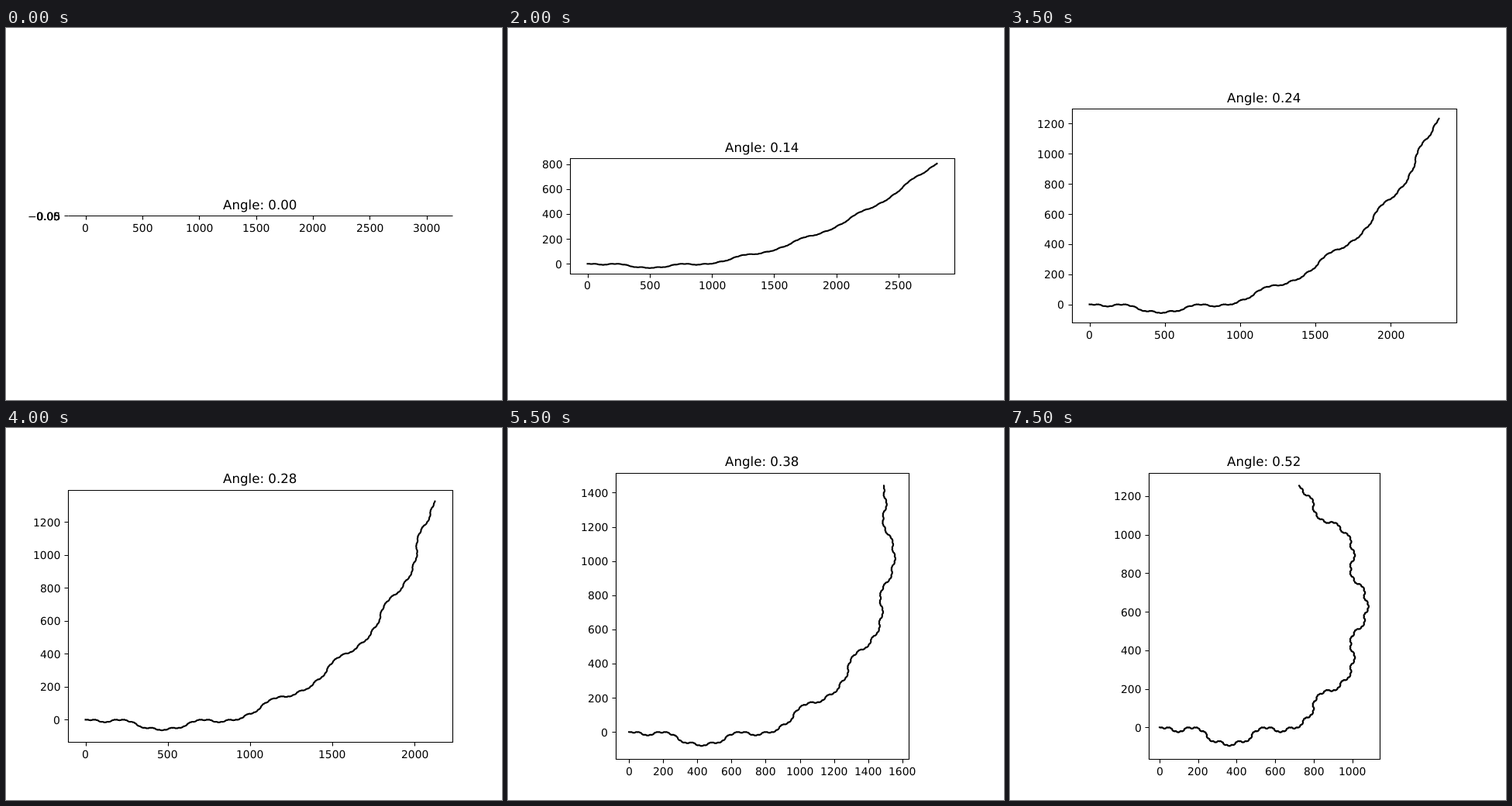
An HTML page that plays this animation: 640x480 px, repeating every 8000 ms.

```html
<!DOCTYPE html>
<html lang="en">
<head>
<meta charset="utf-8">
<title>Folding curve</title>
<style>
  html, body { margin: 0; width: 100%; height: 100%; overflow: hidden; background: #fff; }
  svg { display: block; width: 640px; height: 480px; }
  text { font-family: "DejaVu Sans", sans-serif; text-rendering: geometricPrecision; white-space: pre; }
  path { fill: none; stroke: #000; }
</style>
</head>
<body>
<svg viewBox="0 0 640 480">
  <path id="curve" stroke-width="2.083" stroke-linejoin="round" stroke-linecap="square"/>
  <path id="ticks" stroke-width="1.111"/>
  <path id="frame" stroke-width="1.111" stroke-linecap="square"/>
  <g id="labels"></g>
</svg>
<script>
const STEP_MS = 500, STEPS = 16, SIDE = 4 ** 5;
const AREA = { cx: 328, cy: 242.4, w: 496, h: 369.6 };
const PX_PER_PT = 100 / 72, TICK = 5, PAD = 7 * PX_PER_PT;
const [curve, ticks, frame, labels] =
  ["curve", "ticks", "frame", "labels"].map(id => document.getElementById(id));

// Turn before segment i of a three-sided Koch curve, in units of the angle.
function turn(i) {
  if (i % SIDE === 0) return 2;
  while (i % 4 === 0) i /= 4;
  return i % 4 === 2 ? 2 : -1;
}

function foldedPoints(angle) {
  const points = [[0, 0]];
  let x = 0, y = 0, heading = 0;
  for (let i = 0; i < 3 * SIDE; i++) {
    if (i) heading += turn(i);
    x += Math.cos(heading * angle);
    y += Math.sin(heading * angle);
    points.push([x, y]);
  }
  return points;
}

function limits(values) {
  let min = Math.min(...values), max = Math.max(...values);
  if (min === max) { min -= 0.05; max += 0.05; }
  const margin = (max - min) * 0.05;
  return { min: min - margin, max: max + margin, span: max - min + 2 * margin };
}

// Largest round step that suits the available length and leaves two ticks or more.
function tickValues({ min, max, span }, length, spacing) {
  const bins = Math.max(1, Math.min(9, Math.floor(length / PX_PER_PT / spacing)));
  const raw = span / bins;
  const decade = 10 ** Math.floor(Math.log10(raw));
  const steps = [0.1, 0.2, 0.25, 0.5, 1, 2, 2.5, 5, 10].map(s => s * decade);
  let index = steps.findIndex(s => s >= raw);
  for (; index >= 0; index--) {
    const step = steps[index], values = [];
    for (let n = Math.ceil(min / step); n <= max / step; n++) values.push(n * step);
    if (values.length >= 2 || index === 0) {
      const digits = step < 1 ? 2 : 0;
      return values.map(v => ({ value: v, text: (v + 0).toFixed(digits).replace("-", "\u2212") }));
    }
  }
}

function addText(text, x, y, points, anchor) {
  const node = document.createElementNS("http://www.w3.org/2000/svg", "text");
  node.textContent = text;
  node.setAttribute("font-size", points * PX_PER_PT);
  labels.append(node);
  node.setAttribute("x", Math.round(x - anchor * node.getComputedTextLength()));
  node.setAttribute("y", Math.round(y));
}

const snap = v => Math.floor(v + 0.5) + 0.5;

function draw(step) {
  const angle = step * Math.PI / 90;
  const points = foldedPoints(angle);
  const xLim = limits(points.map(p => p[0])), yLim = limits(points.map(p => p[1]));
  const scale = Math.min(AREA.w / xLim.span, AREA.h / yLim.span);
  const w = xLim.span * scale, h = yLim.span * scale;
  const left = AREA.cx - w / 2, right = left + w;
  const top = AREA.cy - h / 2, bottom = top + h;
  const toX = x => left + (x - xLim.min) * scale;
  const toY = y => bottom - (y - yLim.min) * scale;

  // The flat curve lies in a box without height, so nothing of it shows.
  curve.setAttribute("d", step === 0 ? "" :
    "M" + points.map(([x, y]) => toX(x).toFixed(2) + " " + toY(y).toFixed(2)).join("L"));
  frame.setAttribute("d",
    `M${snap(left)} ${snap(top)}H${snap(right)}V${snap(bottom)}H${snap(left)}Z`);

  labels.replaceChildren();
  let marks = "";
  for (const { value, text } of tickValues(xLim, w, 30)) {
    const x = toX(value);
    marks += `M${snap(x)} ${snap(bottom)}v${TICK}`;
    addText(text, x, bottom + PAD + 11, 10, 0.5);
  }
  for (const { value, text } of tickValues(yLim, h, 20)) {
    const y = toY(value);
    marks += `M${snap(left)} ${snap(y)}h${-TICK}`;
    addText(text, left - PAD, y + 5.5, 10, 1);
  }
  ticks.setAttribute("d", marks);
  addText("Angle: " + angle.toFixed(2), AREA.cx, top - 6 * PX_PER_PT, 12, 0.5);
}

const start = performance.now();
let shown = -1;
function update() {
  const step = Math.floor((performance.now() - start) / STEP_MS) % STEPS;
  if (step !== shown) draw(shown = step);
  requestAnimationFrame(update);
}
update();
</script>
</body>
</html>
```
